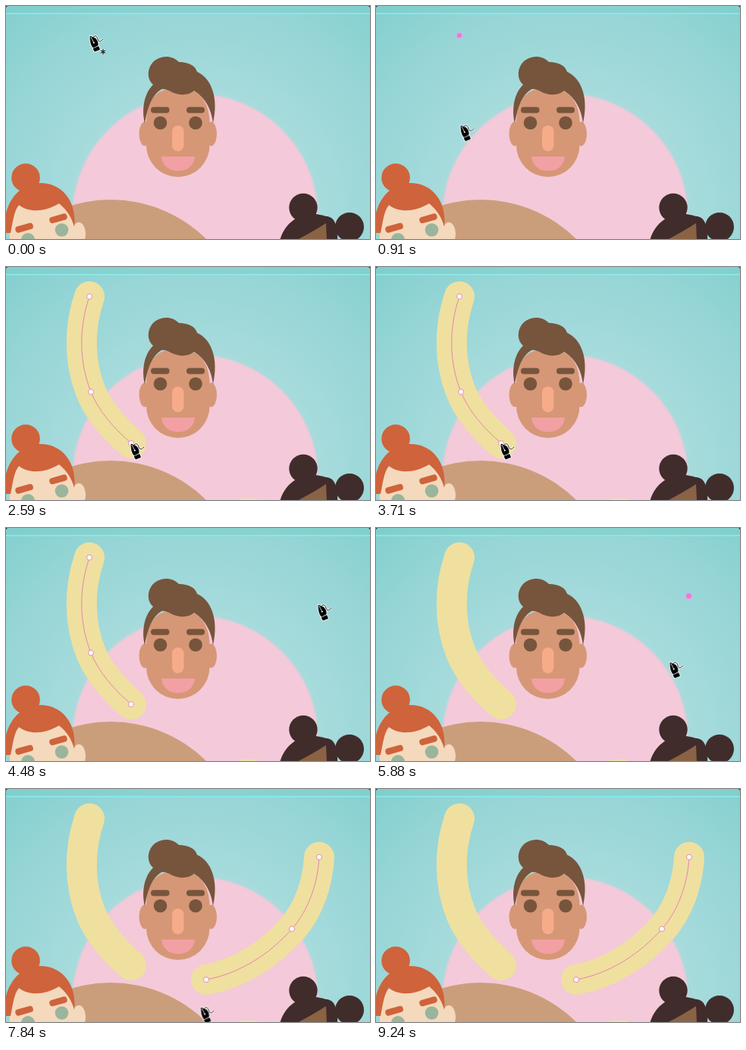
These frames come from a looping animation (480 px wide and 308 px high, 9800 ms). An HTML page without scripts:

```html
<!DOCTYPE html>
<html lang="en">
<head>
<meta charset="utf-8">
<title>Drawing raised arms</title>
<style>
html, body { margin: 0; width: 100%; height: 100%; overflow: hidden; }
svg { display: block; width: 480px; height: 308px; }

.arm { fill: none; stroke: #efe09f; stroke-width: 40; stroke-linecap: round; }
.guide { fill: none; stroke: #df75ae; stroke-width: .85; }
.node { fill: #fff; stroke: #e287b8; stroke-width: 1; }
.hot { fill: #ea78e0; stroke: #f0a0e0; stroke-width: 1; }

/* Switches: each part is on for one span of the loop */
.on { opacity: 0; animation: 9.8s step-end infinite; }
.start1 { animation-name: start1; }
.draft1 { animation-name: draft1; }
.arm1 { animation-name: arm1; }
.sel1 { animation-name: sel1; }
.start2 { animation-name: start2; }
.draft2 { animation-name: draft2; }
.arm2 { animation-name: arm2; }
.star { animation-name: star; }
@keyframes start1 { 0% { opacity: 0 } 2.14% { opacity: 1 } 11.43%, 100% { opacity: 0 } }
@keyframes draft1 { 0% { opacity: 0 } 11.43% { opacity: 1 } 26.43%, 100% { opacity: 0 } }
@keyframes arm1 { 0% { opacity: 0 } 26.43%, 100% { opacity: 1 } }
@keyframes sel1 { 0% { opacity: 0 } 26.43% { opacity: 1 } 50%, 100% { opacity: 0 } }
@keyframes start2 { 0% { opacity: 0 } 55% { opacity: 1 } 62.86%, 100% { opacity: 0 } }
@keyframes draft2 { 0% { opacity: 0 } 62.86% { opacity: 1 } 75.71%, 100% { opacity: 0 } }
@keyframes arm2 { 0% { opacity: 0 } 75.71%, 100% { opacity: 1 } }
@keyframes star { 0% { opacity: 1 } 2.14% { opacity: 0 } 50% { opacity: 1 } 55%, 100% { opacity: 0 } }

/* Rubber bands follow the pen, the placed segment bows with them */
.band1 { animation: band1 9.8s linear infinite; }
.bow1 { animation: bow1 9.8s linear infinite; }
.band2 { animation: band2 9.8s linear infinite; }
.bow2 { animation: bow2 9.8s linear infinite; }
@keyframes band1 {
  0%, 11.43% { d: path("M112 165Q112 165 112 165"); }
  17.14% { d: path("M112 165Q120 186 133 206"); }
  22.9%, 100% { d: path("M112 165Q130 203 165 233"); }
}
@keyframes bow1 {
  0%, 11.43% { d: path("M110 39C110.7 81 111.3 123 112 165"); }
  17.14%, 100% { d: path("M110 39C96 80 96 125 112 165"); }
}
@keyframes band2 {
  0%, 62.86% { d: path("M377 185Q377 185 377 185"); }
  69.29% { d: path("M377 185Q342 240 290 264"); }
  74.3%, 100% { d: path("M377 185Q335 235 264 252"); }
}
@keyframes bow2 {
  0%, 62.86% { d: path("M413 90C401 122 389 153 377 185"); }
  69.29% { d: path("M413 90C407 121 393 157 377 185"); }
  74.3%, 100% { d: path("M413 90C411 125 399 160 377 185"); }
}

.pen { animation: pen 9.8s linear infinite; }
@keyframes pen {
  0%, 2.14% { transform: translate(111px, 40px); animation-timing-function: ease-in-out; }
  10.7%, 11.43% { transform: translate(112px, 165px); }
  17.14% { transform: translate(141px, 212px); animation-timing-function: ease-out; }
  22.9%, 39.29% { transform: translate(165px, 234px); animation-timing-function: ease-in-out; }
  45.71% { transform: translate(412px, 102px); }
  49.3%, 55% { transform: translate(413px, 90px); animation-timing-function: ease-in; }
  60% { transform: translate(388px, 178px); animation-timing-function: ease-out; }
  62.4%, 62.86% { transform: translate(377px, 185px); }
  69.29% { transform: translate(282px, 267px); animation-timing-function: ease-out; }
  74.3%, 76.5% { transform: translate(264px, 252px); animation-timing-function: ease-in; }
  82%, 100% { transform: translate(250px, 330px); }
}

.edge { animation: edge 9.8s step-end infinite; }
@keyframes edge {
  0% { fill: transparent; }
  11.43% { fill: #f2ddc3; }
  26.43%, 100% { fill: transparent; }
}
</style>
</head>
<body>
<svg viewBox="0 0 480 308">
  <defs>
    <radialGradient id="sky" gradientUnits="userSpaceOnUse" cx="250" cy="278" r="390">
      <stop offset=".42" stop-color="#a7dbdc"/>
      <stop offset=".72" stop-color="#96d5d6"/>
      <stop offset="1" stop-color="#80cecd"/>
    </radialGradient>
    <filter id="soft"><feGaussianBlur stdDeviation="1.2"/></filter>
    <g id="nib">
      <path d="M0 0L7 3Q11 7 10 12L4 15Q0 11 0 0ZM4 16.500L11 13.500L12.500 17.500L6 20Z"/>
      <path d="M4 1C8-2 9 1 10 4S13 8 17 4" fill="none"/>
    </g>
    <path id="asterisk" d="M17 17V24M14 18.700L20 22.300M20 18.700L14 22.300"/>
  </defs>

  <rect width="480" height="308" fill="url(#sky)"/>
  <path d="M0 0H480V9H0Z" fill="#7ccfce" opacity=".5"/>
  <path d="M0 10H480" stroke="#8eebe8" stroke-width="1.3"/>
  <path d="M0 0H2L0 2ZM480 0H478L480 2Z" fill="#233"/>
  <circle cx="249.500" cy="278" r="162" fill="#f4c9d9" filter="url(#soft)"/>

  <!-- man -->
  <g fill="#d69777">
    <ellipse cx="183" cy="169" rx="7.5" ry="16"/>
    <ellipse cx="270.500" cy="169" rx="7.5" ry="16"/>
    <path d="M185 150Q187 108 226 108T268.500 150V184A41.700 42 0 0 1 185 184Z"/>
  </g>
  <g fill="#76553c">
    <path d="M183 155C179 138 181 117 194 104C186 97 187 86 190 80C196 66 217 62 228 74C240 74 250 79 252 87C270 95 281 120 273 155C271 138 264 122 248 112C240 119 228 118 219 114C214 111 209 109 205 110C193 117 187 132 183 155Z"/>
    <rect x="191" y="133.500" width="24.500" height="8" rx="4"/>
    <rect x="238" y="133.500" width="24" height="8" rx="4"/>
    <circle cx="203.500" cy="154.500" r="8.800"/>
    <circle cx="250" cy="154.500" r="8.800"/>
  </g>
  <rect x="219" y="158" width="15.500" height="34" rx="7.700" fill="#f6ab89"/>
  <path d="M205 199H249C248 211 239 218 227 218S206 211 205 199Z" fill="#f2a0a4"/>

  <circle cx="138" cy="435" r="179" fill="#cb9e7b"/>

  <!-- redhead -->
  <g fill="#f4d9bd">
    <ellipse cx="96" cy="301" rx="9" ry="15"/>
    <path d="M5 320V285Q10 256 46 256T90 290V320Z"/>
  </g>
  <g fill="#cf633b">
    <circle cx="26" cy="227" r="18.800"/>
    <path d="M-2 300C-5 265 14 235 44 234C73 233 94 258 90 292C87 280 80 269 70 261C50 273 30 273 17 263C10 272 9 286 6 300Z"/>
    <rect x="12" y="289" width="24" height="8.500" rx="4" transform="rotate(-16 24 293)"/>
    <rect x="57" y="276.500" width="24" height="8.500" rx="4" transform="rotate(-16 69 281)"/>
  </g>
  <g fill="#9ab59b">
    <circle cx="29" cy="309" r="9"/>
    <circle cx="73.500" cy="296" r="8.800"/>
  </g>

  <!-- girl with two buns -->
  <g fill="#402c2b">
    <circle cx="392" cy="266.500" r="18.700"/>
    <circle cx="453" cy="292" r="19"/>
    <path d="M361 310C368 286 386 275 405 275C413 275 418 277 422 278C432 278 438 288 437 310Z"/>
  </g>
  <path d="M384 309Q407 297 422 287L423 309Z" fill="#8a6244"/>

  <ellipse class="edge" cx="318" cy="312" rx="42" ry="8"/>

  <!-- left arm -->
  <g class="on start1"><circle class="hot" cx="110" cy="39" r="3.700"/></g>
  <g class="on draft1">
    <path class="arm" d="M110 39L112 165"/>
    <path class="guide" d="M110 39L112 165"/>
    <path class="guide bow1" d="M110 39C96 80 96 125 112 165"/>
    <path class="guide band1" d="M112 165Q120 186 133 206"/>
    <circle class="node" cx="110" cy="39" r="3.500"/>
    <circle class="hot" cx="111.500" cy="165" r="3.700"/>
  </g>
  <g class="on arm1">
    <path class="arm" d="M110 39C96 80 96 125 112 165C122 190 141 212 165 233"/>
    <path d="M308 307H331" stroke="#efe0b0" stroke-width="2"/>
  </g>
  <g class="on sel1">
    <path class="guide" d="M110 39C96 80 96 125 112 165C122 190 141 212 165 233"/>
    <circle class="node" cx="110" cy="39" r="3.500"/>
    <circle class="node" cx="112" cy="165" r="3.500"/>
    <circle class="node" cx="165" cy="233" r="3.500"/>
  </g>

  <!-- right arm -->
  <g class="on start2"><circle class="hot" cx="412.500" cy="90" r="4"/></g>
  <g class="on draft2">
    <path class="arm" d="M413 90L377 185"/>
    <path class="guide" d="M413 90L377 185"/>
    <path class="guide bow2" d="M413 90C407 121 393 157 377 185"/>
    <path class="guide band2" d="M377 185Q342 240 290 264"/>
    <circle class="node" cx="413" cy="90" r="3.500"/>
    <circle class="hot" cx="377" cy="185" r="3.700"/>
  </g>
  <g class="on arm2">
    <path class="arm" d="M413 90C411 125 399 160 377 185C348 218 308 244 264 252"/>
    <path class="guide" d="M413 90C411 125 399 160 377 185C348 218 308 244 264 252"/>
    <circle class="node" cx="413" cy="90" r="3.500"/>
    <circle class="node" cx="377" cy="185" r="3.500"/>
    <circle class="node" cx="264" cy="252" r="3.500"/>
  </g>

  <!-- pen cursor, tip at 0,0, with a white halo -->
  <g class="pen">
    <g stroke="#fff" stroke-width="2.800" stroke-linejoin="round" opacity=".85">
      <use href="#nib"/>
      <g class="on star"><use href="#asterisk"/></g>
    </g>
    <g stroke="#0a0a0a" stroke-width="1.200">
      <use href="#nib" stroke-width=".9"/>
      <g class="on star"><use href="#asterisk"/></g>
    </g>
    <path d="M1 1L4.500 8" stroke="#fff" stroke-width=".8"/>
    <circle cx="4.800" cy="8.500" r="1.100" fill="#fff"/>
  </g>
</svg>
</body>
</html>
```
